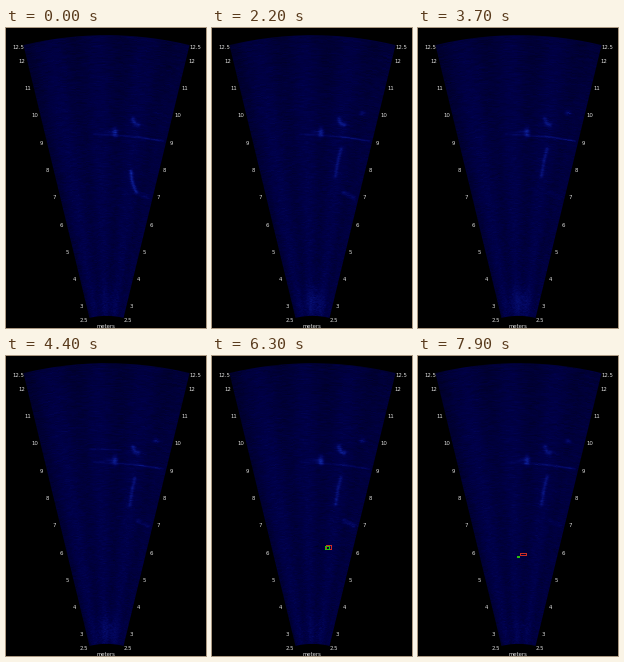
These frames come from a looping animation (200 by 300 pixels, 8 s). A matplotlib script:

```python
import numpy as np
import matplotlib.pyplot as plt
from matplotlib.animation import FuncAnimation

W, H, DPI = 200, 300, 100
FRAMES, STEP = 80, 100
CX, APEX = 100.5, 360.4
R_NEAR, R_FAR, HALF = 72.5, 353.2, np.radians(13.6)
BEAMS, BINS = 96, 282
GREEN, RED = (40, 190, 10), (205, 45, 35)

yy, xx = np.mgrid[0:H, 0:W] + 0.5
radius = np.hypot(xx - CX, APEX - yy)
u = np.arctan2(xx - CX, APEX - yy) / HALF
depth = (radius - R_NEAR) / (R_FAR - R_NEAR)
mask = (np.clip((1 - abs(u)) * HALF * radius + 0.5, 0, 1)
        * np.clip(radius - R_NEAR + 0.5, 0, 1)
        * np.clip(R_FAR - radius + 0.5, 0, 1))
beam = np.clip(((u + 1) / 2 * BEAMS).astype(int), 0, BEAMS - 1)
rbin = np.clip((depth * BINS).astype(int), 0, BINS - 1)


def speckle(seed):
    """Noise per beam and range, smeared along the beams."""
    n = np.random.default_rng(seed).normal(size=(BINS, BEAMS))
    n = sum(np.roll(n, k, 1) for k in range(4)) / 2
    return n[rbin, beam]


def blob(x, y, sx, sy):
    return np.exp(-((xx - x) / sx) ** 2 - ((yy - y) / sy) ** 2)


def streak(points, width):
    """Soft line through a few points."""
    d = np.full((H, W), 1e9)
    for (x0, y0), (x1, y1) in zip(points, points[1:]):
        dx, dy = x1 - x0, y1 - y0
        k = np.clip(((xx - x0) * dx + (yy - y0) * dy) / (dx * dx + dy * dy), 0, 1)
        d = np.minimum(d, np.hypot(xx - x0 - k * dx, yy - y0 - k * dy))
    return np.exp(-(d / width) ** 2)


def bell(t, mid, spread):
    return np.exp(-((t - mid) / spread) ** 2)


rock = blob(109, 104.5, 2.8, 4.5) + .3 * blob(104, 104, 4, 2)
ledge = streak([(127, 91), (129, 96), (132, 97)], 2.2)
ridge = streak([(115, 98), (126, 95), (140, 97)], 1.3)
patch = blob(150, 85, 3.2, 2.5)
cable = streak([(88, 106), (132, 109), (157, 113)], 1) * np.clip((xx - 70) / 70, .4, 1)
ghost = streak([(84, 93), (115, 94)], .8)
tip = streak([(128, 126), (133, 121)], 1.4)
tail = streak([(132, 165), (142, 170)], 2.2)
glow = blob(102, 275, 11, 15)
CALM = np.array([(129, 121), (126, 133), (123.5, 148)])
SWEPT = np.array([(125, 143), (126, 153), (130, 164)])

base = .035 * np.cos(2 * np.pi * (u + .1) / .57) - .35 * np.clip(abs(u) - .85, 0, 1)
base -= .05 * depth ** 4
static = speckle(1)


def echoes(t):
    sweep = max(0, np.cos(2 * np.pi * t / 5300)) ** 4
    late = bell(t, 5300, 450)
    weed = CALM + (SWEPT - CALM) * sweep + np.array([3, 3]) * late
    surge = np.cos(2 * np.pi * (t - 1300) / 4200)
    return (.43 * rock + (.28 + .04 * surge) * ledge
            + (.04 + .14 * late) * ridge
            + .24 * (1 - .75 * sweep) * patch
            + .24 * (1 - bell(t, 5650, 600)) * cable
            + .12 * bell(t, 4400, 300) * ghost
            + (.22 + .12 * sweep) * streak(weed, 1.8)
            + .3 * late * tip
            + (.14 + .09 * surge) * tail
            + (.05 + .15 * bell(t, 2900, 2200)) * glow)


def box(img, x, y, w, h, color):
    x, y = int(round(x)), int(round(y))
    img[[y, y + h], x:x + w + 1] = color
    img[y:y + h + 1, [x, x + w]] = color


def draw_swarm(img, t):
    rng = np.random.default_rng(t)
    box(img, *rng.normal((96, 244), .6), 5, 6, GREEN)
    for _ in range(13):
        x, y = rng.normal((104, 251), (4.5, 7))
        box(img, x, np.clip(y, 234, 270), *rng.integers(1, 3, 2), GREEN)


def draw_target(img, t):
    k = (t - 6300) / 1600
    x, y = 113 - 11 * k, 189 + 8 * k
    if t < 7100:
        box(img, x + 1, y, 5, 4, RED)
        box(img, x, y + 1, 4, 3, GREEN)
    else:
        box(img, x, y, 6, 2, RED)
        box(img, x - 3, y + 3, 2, 1, GREEN)


def render(i):
    t = i * STEP
    fresh = speckle(100 + i)
    v = base + .014 * static + .018 * fresh + echoes(t) * (1 + .09 * fresh)
    hot = np.clip(v, 0, 1)
    rgb = np.stack([38 * hot ** 1.3, 100 * hot ** 1.4, 67 + 185 * v], -1)
    img = np.clip(rgb * mask[..., None], 0, 255).astype(np.uint8)
    if 2700 <= t <= 3500:
        draw_swarm(img, t)
    if t >= 5900:
        draw_target(img, t)
    return img


fig = plt.figure(figsize=(W / DPI, H / DPI), dpi=DPI, facecolor="black")
picture = fig.figimage(render(0), 0, 0, origin="upper")


def label(x, y, text):
    fig.text(x / W, 1 - y / H, text, color="#dddddd", fontsize=5.4 * 72 / DPI,
             family="DejaVu Sans", ha="center", va="center_baseline")


for m in [2.5, *range(3, 13), 12.5]:
    y = 360.4 - 27.3 * m
    label(94.6 - 6.6 * m, y, f"{m:g}")
    label(105.2 + 6.7 * m, y, f"{m:g}")
label(100, 298.2, "meters")


def update(i):
    picture.set_data(render(i))
    return [picture]


anim = FuncAnimation(fig, update, frames=FRAMES, interval=STEP,
                     repeat=True, repeat_delay=0)
plt.show()
```
